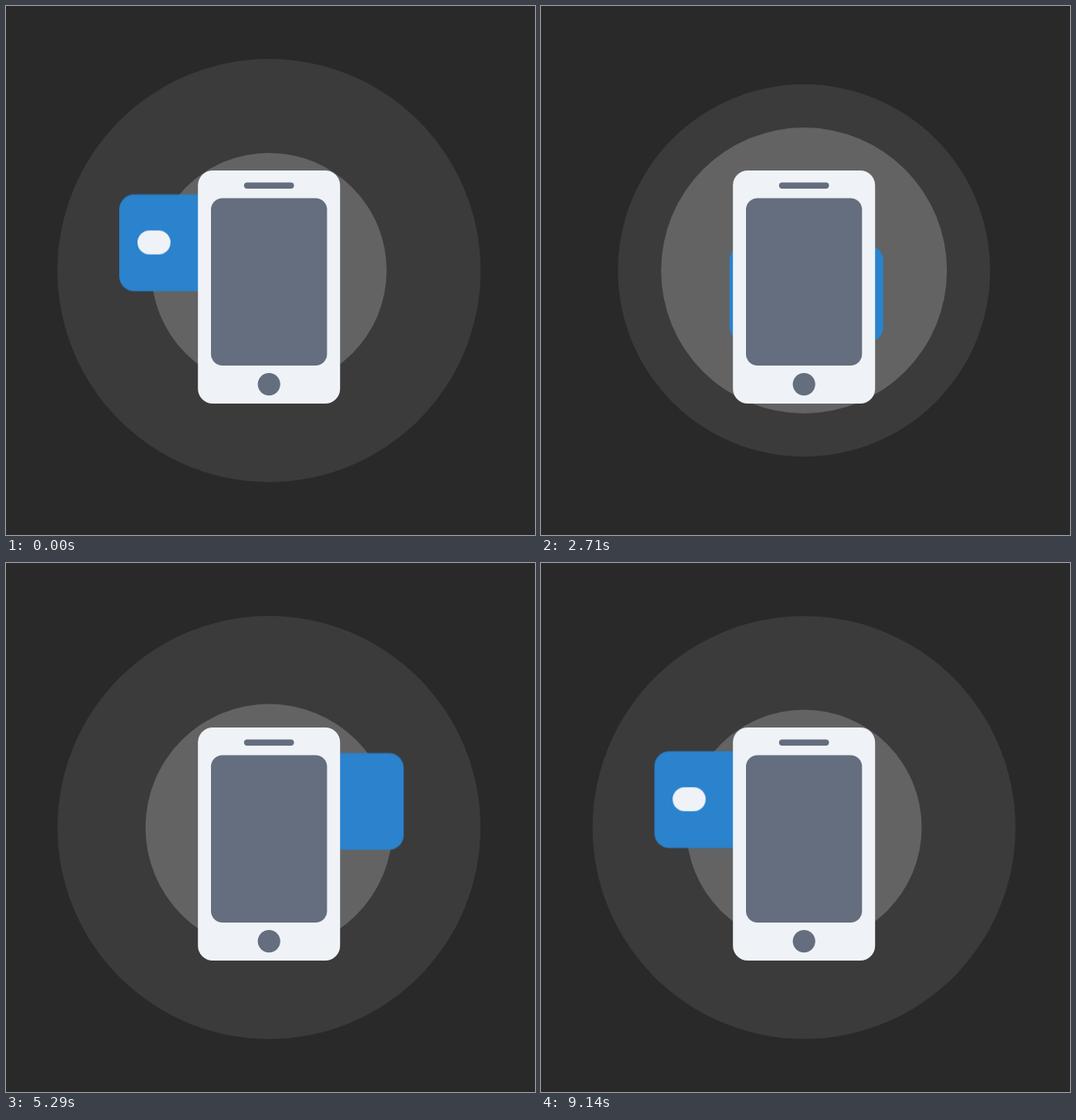
An HTML page for the animation above (9.21 s loop, 640 by 640 pixels).

```html
<!DOCTYPE html>
<html lang="en">
<head>
<meta charset="utf-8">
<title>Card and phone</title>
<style>
  html, body { margin: 0; width: 100%; height: 100%; overflow: hidden; background: #292929; }
  svg { display: block; width: 100vw; height: 100vh; }

  :root { --smooth: cubic-bezier(.3333, 0, .6667, 1); }
  .outer, .inner, .card-x, .card-y { animation: 9.21s var(--smooth) infinite; }
  .outer { fill: #3b3b3b; animation-name: outer; }
  .inner { fill: #636363; animation-name: inner; }
  .card-x { animation-name: card-x; }
  .card-y { animation-name: card-y; }
  .blue { fill: #2b82cd; }
  .light { fill: #eff3f7; }
  .slate { fill: #656e7e; }

  @keyframes outer {
    0%, 8.333%, 58.333%, 100% { r: 256px; }
    33.333%, 83.333% { r: 223px; }
  }
  @keyframes inner {
    0%, 50%, 100% { r: 142.3px; }
    25%, 75% { r: 175.7px; }
  }
  /* Separate axes let the card follow a slightly bowed path. */
  @keyframes card-x {
    0%, 100% { transform: translateX(230px); }
    15.83% { transform: translateX(275px); }
    50% { transform: translateX(406.8px); }
    76.67% { transform: translateX(308.9px); }
  }
  @keyframes card-y {
    0%, 100% { transform: translateY(286.5px); }
    15.83% { transform: translateY(365px); animation-timing-function: cubic-bezier(.4, 0, .733, 1); }
    50% { transform: translateY(305.6px); }
    76.67% { transform: translateY(215.7px); }
  }
</style>
</head>
<body>
<svg viewBox="0 0 640 640">
  <circle class="outer" cx="318.2" cy="320" r="256"/>
  <circle class="inner" cx="318.2" cy="320" r="142.3"/>

  <g class="card-x">
    <g class="card-y">
      <rect class="blue" x="-93" y="-58.5" width="186" height="117" rx="18"/>
      <rect class="light" x="-71" y="-15" width="40" height="29" rx="14.5"/>
    </g>
  </g>

  <g class="phone">
    <rect class="light" x="232.2" y="199" width="172" height="282" rx="18"/>
    <rect class="slate" x="288" y="213.5" width="60.4" height="7.4" rx="3.7"/>
    <rect class="slate" x="248" y="232.5" width="140.4" height="202.5" rx="14"/>
    <circle class="slate" cx="318.2" cy="457.6" r="13.6"/>
  </g>
</svg>
</body>
</html>
```
